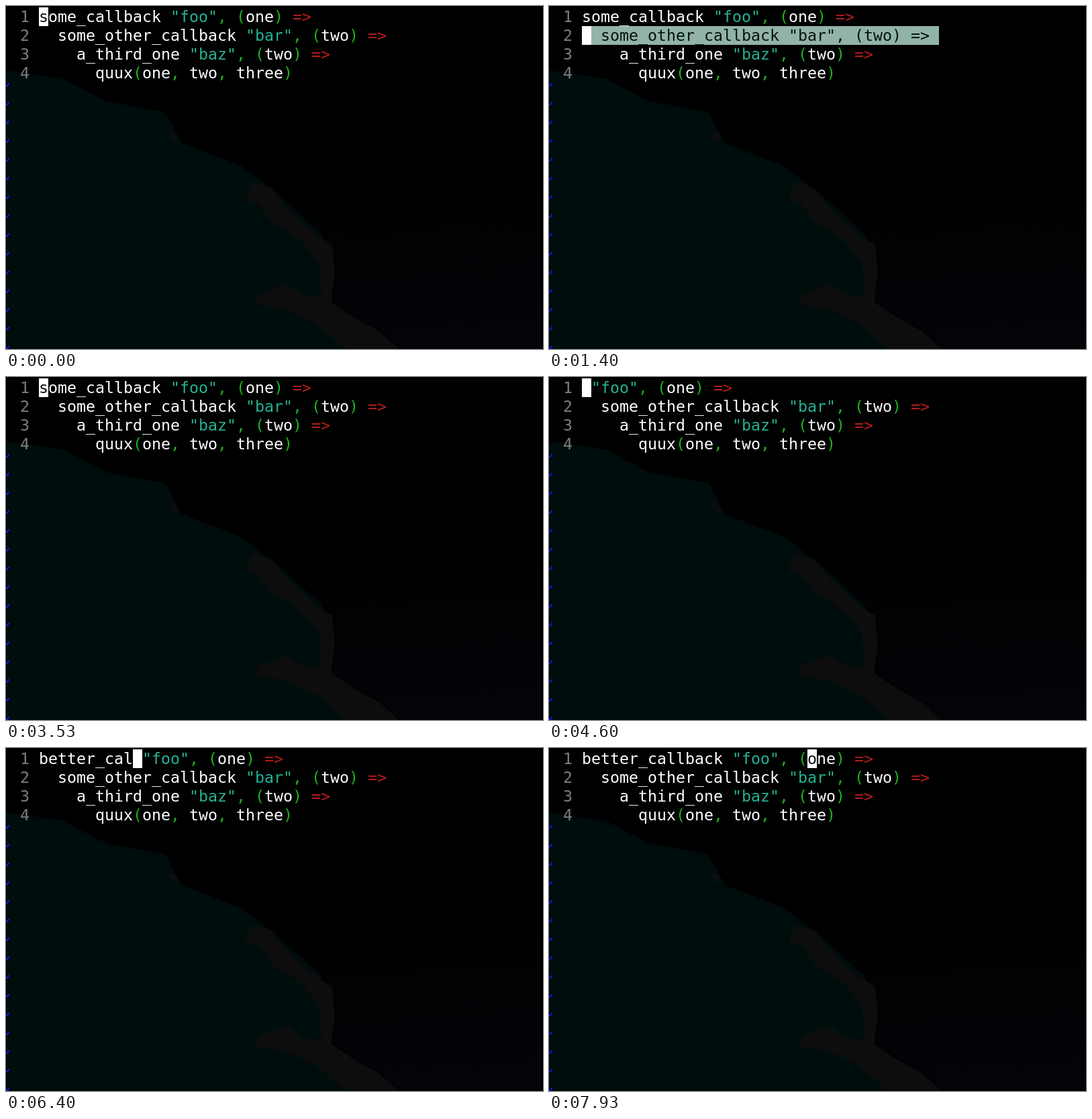
Write an HTML page that moves like this. It is 800 px wide and 512 px high and loops after 8000 ms.

```html
<!DOCTYPE html>
<html>
<head>
<meta charset="utf-8">
<style>
  html, body { margin: 0; width: 100%; height: 100%; overflow: hidden; background: #000; }
  svg { display: block; width: 800px; height: 512px; }
  text { font: 23.25px "DejaVu Sans Mono", "Liberation Mono", monospace; fill: #fff; }
  .num { fill: #7c7f80; }
  .str { fill: #25b395; }
  .punct { fill: #1cb41c; }
  .arrow { fill: #b81c1c; }
  .dark { fill: #06100c; }
</style>
</head>
<body>
<svg viewBox="0 0 800 512">
  <defs>
    <filter id="soft" x="-10%" y="-10%" width="120%" height="120%"><feGaussianBlur stdDeviation="5"/></filter>
    <linearGradient id="haze" x1=".4" y1="0" x2=".5" y2="1">
      <stop offset=".5" stop-color="#000"/>
      <stop offset="1" stop-color="#030408"/>
    </linearGradient>
  </defs>
  <rect width="800" height="512" fill="url(#haze)"/>
  <g filter="url(#soft)">
    <path fill="#03070a" d="M-10 94L85 108L150 142L238 158L262 204L350 238L405 280L470 340L492 400L482 440L590 520H-10Z"/>
    <path fill="#091011" d="M234 186l18 2l10 18l-14 -6ZM366 262L396 272L412 294L436 318L462 342L486 356L490 398L484 442L520 466L556 486L590 516H510L462 474L420 454L368 444L378 430L418 414L444 432L470 436L466 384L444 356L420 336L398 326L376 296L356 290Z"/>
  </g>
  <g id="tildes" fill="none" stroke="#1414d8" stroke-width="2"></g>
  <g id="editor"></g>
</svg>
<script>
const LOOP = 8000, CELL = 14, ROW = 28, LEFT = 49, TOP = 2, BASE = 22;
const WORD = 'better_callback', REST = ' "foo", (one) =>';
const LINES = [
  'some_callback' + REST,
  '  some_other_callback "bar", (two) =>',
  '    a_third_one "baz", (two) =>',
  '      quux(one, two, three)'
];
// [start, row, column, line selected]
const MOVES = [
  [0, 0, 0, false], [500, 0, 0, true], [900, 0, 0, false],
  [1070, 1, 0, false], [1200, 1, 0, true], [1800, 1, 0, false],
  [1890, 2, 0, false], [2010, 2, 0, true], [2500, 2, 0, false],
  [2670, 3, 0, false], [2800, 3, 0, true], [3300, 3, 0, false],
  [3500, 0, 0, false],
  [7200, 0, 14, false], [7400, 0, 16, false], [7540, 0, 17, false],
  [7680, 0, 20, false], [7820, 0, 24, false]
];
const CHANGE_AT = 4600, TYPE_AT = 5070, ESCAPE_AT = 7200, KEY = 140;

const editor = document.getElementById('editor');
const x = col => LEFT + col * CELL;
const y = row => TOP + row * ROW;
const put = (row, col, cls, s) =>
  `<text class="${cls}" x="${x(col)}" y="${y(row) + BASE}">${s.replace('>', '&gt;')}</text>`;
const box = (row, col, cells, fill) =>
  `<rect x="${x(col)}" y="${y(row)}" width="${cells * CELL}" height="${ROW}" fill="${fill}"/>`;

function kind(token) {
  if (token[0] === '"') return 'str';
  if (token === '=>') return 'arrow';
  return /\w/.test(token) ? 'word' : 'punct';
}

function stateAt(t) {
  let [, row, col, selected] = MOVES.filter(m => m[0] <= t).pop();
  let first = LINES[0];
  if (t >= CHANGE_AT) {
    const typed = Math.floor((t - TYPE_AT) / KEY) + 1;
    const count = Math.max(0, Math.min(WORD.length, typed));
    first = WORD.slice(0, count) + REST;
    if (t < ESCAPE_AT) col = count;
  }
  return { row, col, selected, lines: [first, ...LINES.slice(1)] };
}

function render({ row, col, selected, lines }) {
  let out = '';
  lines.forEach((line, r) => {
    const marked = selected && r === row;
    if (marked) out += box(r, 0, line.length + 1, '#91b3a8');
    out += put(r, -2, 'num', String(r + 1));
    for (const m of line.matchAll(/"\w+"|=>|\w+|[(),]/g))
      out += put(r, m.index, marked ? 'dark' : kind(m[0]), m[0]);
  });
  out += box(row, col, 1, '#fff');
  const under = lines[row][col];
  if (under !== ' ') out += put(row, col, 'dark', under);
  editor.innerHTML = out;
}

document.getElementById('tildes').innerHTML = Array.from({ length: 15 }, (_, i) =>
  `<path d="M0 ${119 + i * ROW}h2l2 -3h1"/>`).join('');

let shown = '';
function frame() {
  const state = stateAt(performance.now() % LOOP);
  const key = JSON.stringify(state);
  if (key !== shown) {
    render(state);
    shown = key;
  }
  requestAnimationFrame(frame);
}
frame();
</script>
</body>
</html>
```
